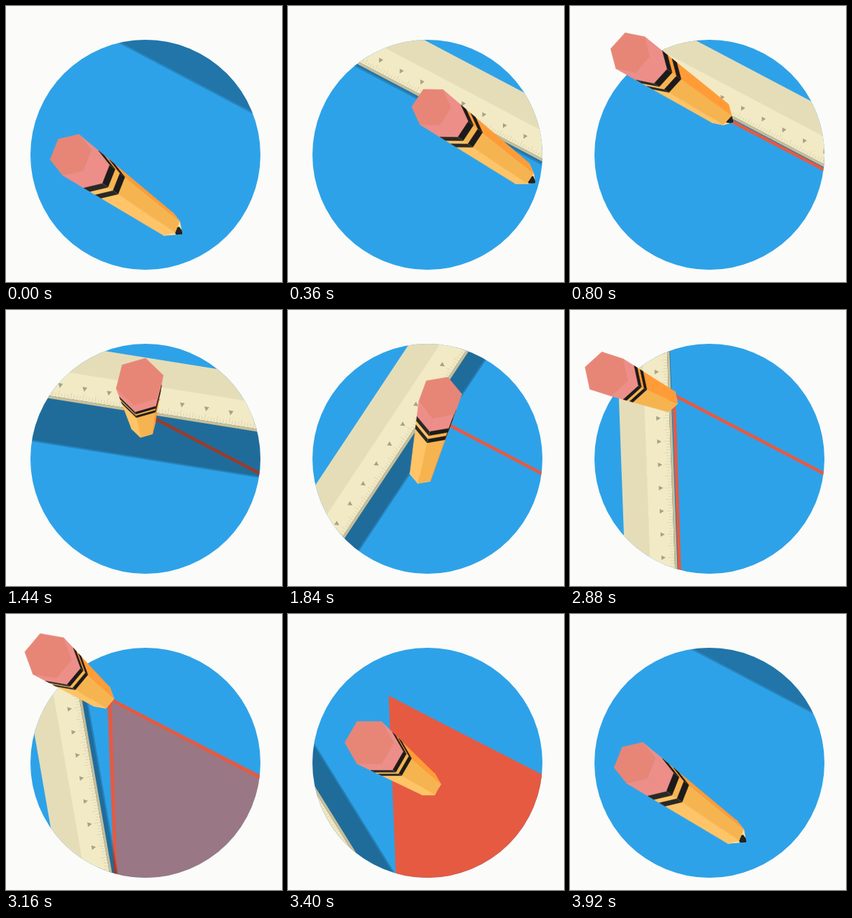
Write an HTML page with a canvas that moves like this. It is 384x384 px and loops after 3.96 s.

```html
<!DOCTYPE html>
<html lang="en">
<head>
<meta charset="utf-8">
<title>Pencil and ruler</title>
<style>
  html, body { margin: 0; width: 100%; height: 100%; overflow: hidden; background: #fbfbf9; }
  canvas { display: block; width: 384px; height: 384px; }
</style>
</head>
<body>
<canvas id="stage" width="384" height="384"></canvas>
<script>
const ctx = document.getElementById('stage').getContext('2d');
const LOOP = 3960, STEP = 40, RAD = Math.PI / 180;
const PAPER = '#fbfbf9', BLUE = '#2ea2e8', RED = '#e65a41';

const LINE_A = { start: 440, end: 1080, from: [353, 227.5], to: [142, 117] };
const LINE_B = { start: 2400, end: 2960, from: [152.5, 364], to: [144.5, 118] };
const LINES = [LINE_A, LINE_B];

// Key poses, passed through smoothly
const pencilPose = (at, eraser, size, tip, roll) => ({ at, values: [...eraser, size, ...tip, roll] });
const REST = [[90, 207], 31, [245, 317], 20];
const PENCIL = [
  pencilPose(0, ...REST),
  pencilPose(LINE_A.start, [210, 124], 29, LINE_A.from, 36),
  pencilPose(800, [84, 65], 30, [225, 159], 43),
  pencilPose(LINE_A.end, [49, 58], 31, LINE_A.to, 45),
  pencilPose(1440, [186, 100], 34, [192, 169], 74),
  pencilPose(2280, [223, 149], 26, [162, 331], 83),
  pencilPose(LINE_B.start, [195, 180], 28, LINE_B.from, 76),
  pencilPose(LINE_B.end, [45, 72], 32, LINE_B.to, 45),
  pencilPose(3100, [50, 46], 33, [138, 112], 42),
  pencilPose(3400, [113, 179], 34, [207, 245], 30),
  pencilPose(3720, ...REST)
];

const rulerPose = (at, anchor, angle, lift) => ({ at, values: [...anchor, angle, lift] });
const ON_A = [[211, 128], 27.8, 1], ON_B = [[124.3, 183], -92.1, 1];
const RULER = [
  rulerPose(-360, [295, -31], 27.8, 60),
  rulerPose(0, [263, 29], 27.8, 50),
  rulerPose(440, ...ON_A),
  rulerPose(1120, ...ON_A),
  rulerPose(1440, [211, 127], 9.1, 63),
  rulerPose(2160, ...ON_B),
  rulerPose(3000, ...ON_B),
  rulerPose(3400, [16.6, 242.8], -121.8, 31),
  rulerPose(3600, [-85, 306], -135, 55)
];

const clamp = v => Math.max(0, Math.min(1, v));
const ramp = (t, a, b) => (1 - Math.cos(Math.PI * clamp((t - a) / (b - a)))) / 2;
const mix = (a, b, u) => [a[0] + (b[0] - a[0]) * u, a[1] + (b[1] - a[1]) * u];
const lineEnd = (line, t) => mix(line.from, line.to, ramp(t, line.start, line.end));

// Cubic interpolation that never overshoots a pose
function sample(poses, t) {
  const last = poses.length - 1;
  if (t >= poses[last].at) return poses[last].values;
  const i = poses.findIndex((p, n) => poses[n + 1].at > t);
  const rate = (k, c) =>
    (poses[k + 1].values[c] - poses[k].values[c]) / (poses[k + 1].at - poses[k].at);
  const slope = (k, c) => {
    if (k === 0 || k === last) return 0;
    const a = rate(k - 1, c), b = rate(k, c);
    return a * b > 0 ? 2 * a * b / (a + b) : 0;
  };
  const span = poses[i + 1].at - poses[i].at, u = (t - poses[i].at) / span;
  const w = u * u * (3 - 2 * u);
  return poses[i].values.map((p, c) => p * (1 - w) + poses[i + 1].values[c] * w
    + span * u * (1 - u) * ((1 - u) * slope(i, c) - u * slope(i + 1, c)));
}

function poly(points, color, seam = 0.5) {
  ctx.beginPath();
  points.forEach(p => ctx.lineTo(p[0], p[1]));
  ctx.closePath();
  ctx.fillStyle = color;
  ctx.fill();
  if (seam) {
    ctx.lineWidth = seam;
    ctx.strokeStyle = color;
    ctx.stroke();
  }
}

function strip(top, bottom, color) {
  ctx.fillStyle = color;
  ctx.fillRect(-600, top, 1200, bottom - top);
}

function drawMarks(t) {
  ctx.save();
  ctx.globalAlpha = 1 - ramp(t, 3480, 3720);
  ctx.strokeStyle = RED;
  ctx.lineWidth = 4.5;
  for (const line of LINES) {
    if (t <= line.start) continue;
    ctx.beginPath();
    ctx.moveTo(...mix(line.to, line.from, 1.1));
    ctx.lineTo(...lineEnd(line, t));
    ctx.stroke();
  }
  ctx.globalAlpha *= ramp(t, 3060, 3240);
  poly([[140, 114], [353, 223], [384, 239], [384, 384], [151, 384]], RED, 0);
  ctx.restore();
}

function drawRuler(t) {
  const time = t > 3600 ? t - LOOP : t;
  const [x, y, angle, lift] = sample(RULER, time);
  const scale = 1 + lift * 0.001, edge = 18.7, unit = 32.3;
  ctx.save();
  ctx.translate(x, y);
  ctx.rotate(angle * RAD);
  ctx.scale(scale, scale);

  const dark = time < LINE_A.start ? 0.28 : 0.335;
  const reach = edge + lift / scale, soft = Math.min(2, lift / 2);
  strip(0, reach - soft, `rgba(0,0,0,${dark})`);
  strip(reach - soft, reach, `rgba(0,0,0,${dark * 0.6})`);

  strip(-54, -18.5, '#e5ddb8');
  strip(-19, 15.2, '#f2eac5');
  strip(15.2, edge, '#c7be99');
  for (let i = -14; i <= 14; i++) {
    const left = i * unit;
    poly([[left - 3.2, -3], [left + 3.2, -3], [left, 3]], '#a7a287', 0);
    ctx.fillStyle = '#dbd2ae';
    for (let k = 0; k < 8; k++) {
      const size = k % 4 ? 5 : 8;
      ctx.fillRect(left + k * unit / 8 - 0.4, 14.5 - size, 0.8, size);
    }
  }
  ctx.restore();
}

function drawPencil(t) {
  const [ex, ey, size, poseX, poseY, roll] = sample(PENCIL, t);
  const active = LINES.find(l => t >= l.start && t <= l.end);
  const tip = active ? lineEnd(active, t) : [poseX, poseY];
  const end = mix(tip, [ex, ey], 0.125);
  const length = Math.hypot(tip[0] - ex, tip[1] - ey) || 1;
  const ux = (tip[0] - ex) / length, uy = (tip[1] - ey) / length;
  const shorten = Math.max(0, length - 130) * 0.0018;

  // Hexagon seen at an angle: flattened along the pencil's axis
  const hexagon = (cx, cy, r) => Array.from({ length: 6 }, (_, n) => {
    const a = (roll - 30 + n * 60) * RAD;
    const px = Math.cos(a) * r, py = Math.sin(a) * r;
    const cut = (px * ux + py * uy) * shorten;
    return [cx + px - ux * cut, cy + py - uy * cut];
  });
  const near = hexagon(ex, ey, size), far = hexagon(...end, 17.3);

  const point = far.map(p => mix(p, tip, 0.68));
  far.forEach((p, n) => poly([p, far[(n + 1) % 6], tip], '#fde2a6'));
  point.forEach((p, n) => poly([p, point[(n + 1) % 6], tip], '#1f1f1f'));

  near.forEach((a, n) => {
    const m = (n + 1) % 6, b = near[m], c = far[n], d = far[m];
    const facing = (b[0] - a[0]) * (c[1] - a[1]) - (b[1] - a[1]) * (c[0] - a[0]);
    if (facing >= 0) return;
    const ring = (from, to, color) =>
      poly([mix(a, c, from), mix(b, d, from), mix(b, d, to), mix(a, c, to)], color);
    const wood = n === 0 ? '#f6b450' : n === 1 ? '#ffc467' : '#ff9c37';
    const black = n === 1 ? '#2a2827' : '#1c1b1b';
    ring(0.2, 1, wood);
    ring(0, 0.21, '#ed8e89');
    ring(0.21, 0.27, black);
    ring(0.325, 0.38, black);
  });
  poly(near, '#e78676');
}

function render(t) {
  ctx.fillStyle = PAPER;
  ctx.fillRect(0, 0, 384, 384);
  ctx.save();
  ctx.beginPath();
  ctx.arc(194, 207, 160, 0, 7);
  ctx.fillStyle = BLUE;
  ctx.fill();
  ctx.clip();
  drawMarks(t);
  drawRuler(t);
  ctx.restore();
  drawPencil(t);
}

const origin = performance.now();
function tick() {
  const t = (performance.now() - origin) % LOOP;
  render(Math.floor(t / STEP) * STEP);
  requestAnimationFrame(tick);
}
tick();
</script>
</body>
</html>
```
